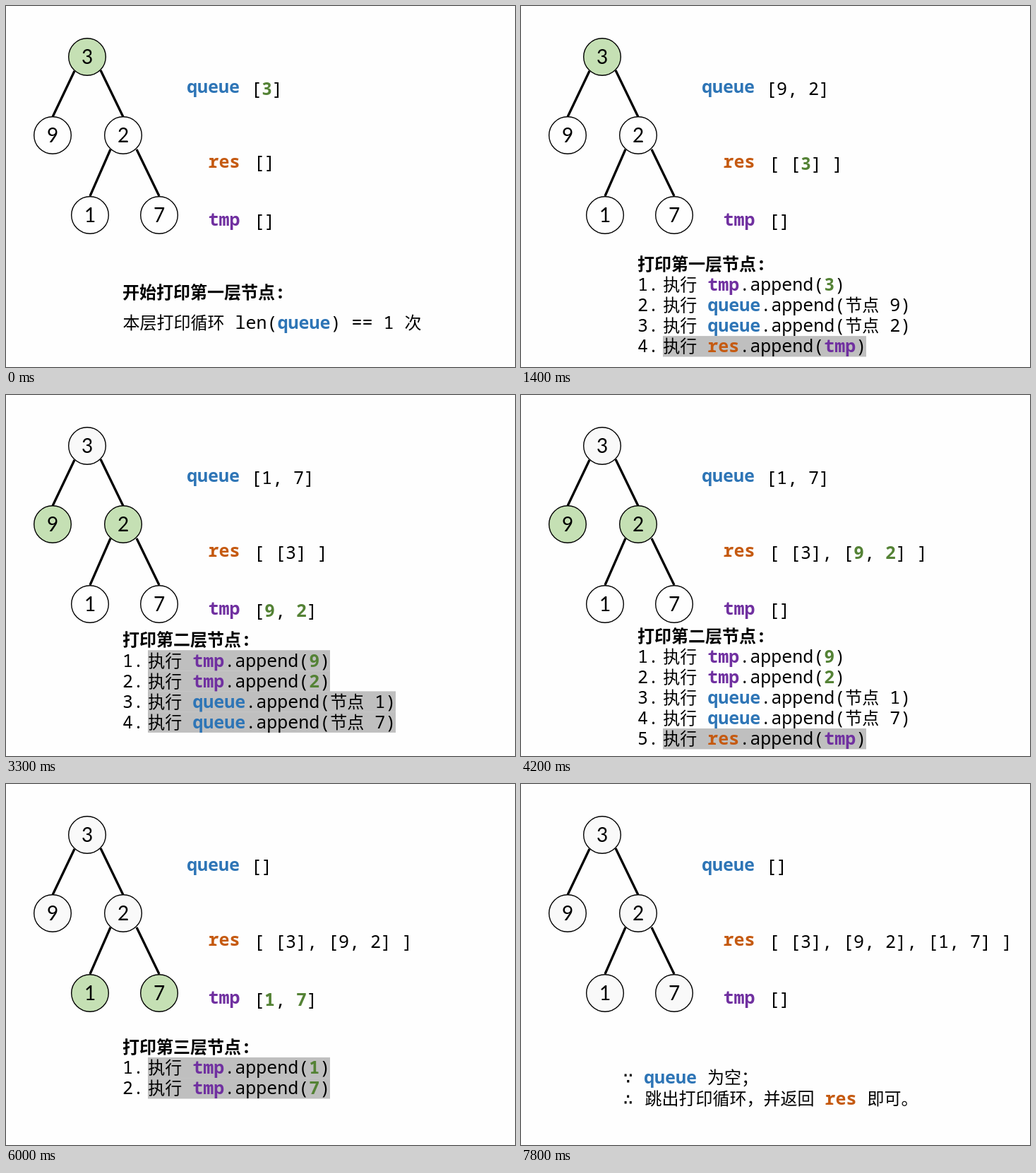
These frames come from a looping animation (721 px wide and 511 px high, 8000 ms). An HTML page:

```html
<!DOCTYPE html>
<html lang="zh-CN">
<head>
<meta charset="utf-8">
<style>
  html, body { margin: 0; height: 100%; overflow: hidden; background: #fefefe; }
  svg { display: block; }
  text { font: 25px "Noto Sans Mono", monospace; white-space: pre; }
  .cjk { font: 300 24px "Noto Sans CJK SC Light", "Noto Sans CJK SC", sans-serif; }
  .title, .queue, .res, .tmp, .hot { font-weight: 700; }
  .title .cjk { font: 700 24px "Noto Sans CJK SC", sans-serif; }
  .queue { fill: #2e75b6; }
  .res { fill: #c55a11; }
  .tmp { fill: #7030a0; }
  .hot { fill: #548235; }
  .sign { font: 24px "DejaVu Sans Mono", monospace; }
  .node { font: 28px Lato, sans-serif; text-anchor: middle; }
</style>
</head>
<body>
<svg id="stage" width="721" height="511" viewBox="0 0 721 511"></svg>
<script>
const LOOP = 8000, CHAR = 15, LINE = 29.1;
const stage = document.getElementById('stage');

// value, x, y, level
const nodes = [[3, 115, 72, 0], [9, 66, 183, 1], [2, 166, 183, 1], [1, 119, 296, 2], [7, 217, 296, 2]];
const edges = 'M97 92L66 157M134 91L166 157M148 203L119 269M185 203L217 269';

// Variable names get their colour, *n is a highlighted number, Chinese runs get their own font.
function text(x, y, content, cls = '') {
  const spans = content.replace(/queue|res|tmp|\*(\d)|[\u3000-\u9fff，；]+/g, (run, digit) => {
    const name = digit ? 'hot' : /[a-z]/.test(run) ? run : 'cjk';
    return `<tspan class="${name}">${digit || run}</tspan>`;
  });
  return `<text x="${x}" y="${y}" class="${cls}">${spans}</text>`;
}

function tree(level) {
  return `<path d="${edges}" stroke="#000" stroke-width="3.3"/>` + nodes.map(([n, x, y, depth]) => {
    const fill = depth === level ? '#c5e0b4' : depth < level ? '#f9f9f9' : '#fefefe';
    return `<circle cx="${x}" cy="${y}" r="26.3" fill="${fill}" stroke="#000" stroke-width="1.4"/>` +
      text(x, y + 10, String(n), 'node');
  }).join('');
}

function variable(name, value, right, x, y) {
  return text(right - name.length * CHAR, y, name) + text(x, y + (value === '[]' ? 1.5 : 3), value);
}

function intro(ordinal, count) {
  return text(165, 414, `开始打印第${ordinal}层节点:`, 'title') +
    text(165.5, 457, `本层打印循环 len(queue) == ${count} 次`);
}

// Numbered calls; those from index `from` on are marked grey.
function steps(ordinal, top, from, calls) {
  return text(165, top - 6, `打印第${ordinal}层节点:`, 'title') + calls.map((call, i) => {
    const y = top + i * LINE;
    const wide = (call.match(/[\u4e00-\u9fff]/g) || []).length;
    const narrow = call.replace('*', '').length - wide;
    const width = 48 + CHAR * (narrow + 1) + wide * 24;
    const mark = i < from ? '' :
      `<rect x="201" y="${y}" width="${width}" height="${LINE + 0.3}" fill="#bfbfbf"/>`;
    return mark + text(165, y + 23.3, `${i + 1}.`) + text(201.3, y + 23.3, `执行 ${call}`);
  }).join('');
}

const ending = text(144.5, 424, '∵', 'sign') + text(174, 424, 'queue 为空；') +
  text(144.5, 454, '∴', 'sign') + text(175.5, 454, '跳出打印循环，并返回 res 即可。');

const save = 'res.append(tmp)';
const first = ['tmp.append(*3)', 'queue.append(节点 9)', 'queue.append(节点 2)'];
const second = ['tmp.append(*9)', 'tmp.append(*2)', 'queue.append(节点 1)', 'queue.append(节点 7)'];
const third = ['tmp.append(*1)', 'tmp.append(*7)'];

// start, tree level, queue, res, tmp, caption
const scenes = [
  [0, 0, '[*3]', '[]', '[]', intro('一', 1)],
  [500, 0, '[9, 2]', '[]', '[*3]', steps('一', 379.8, 0, first)],
  [1400, 0, '[9, 2]', '[ [*3] ]', '[]', steps('一', 379.8, 3, [...first, save])],
  [2300, 1, '[*9, *2]', '[ [3] ]', '[]', intro('二', 2)],
  [3300, 1, '[1, 7]', '[ [3] ]', '[*9, *2]', steps('二', 361.2, 0, second)],
  [4200, 1, '[1, 7]', '[ [3], [*9, *2] ]', '[]', steps('二', 355.6, 4, [...second, save])],
  [5100, 2, '[*1, *7]', '[ [3], [9, 2] ]', '[]', intro('三', 2)],
  [6000, 2, '[]', '[ [3], [9, 2] ]', '[*1, *7]', steps('三', 387, 0, third)],
  [6900, 2, '[]', '[ [3], [9, 2], [*1, *7] ]', '[]', steps('三', 387, 2, [...third, save])],
  [7800, 3, '[]', '[ [3], [9, 2], [1, 7] ]', '[]', ending]
];

let shown;
function frame() {
  const time = performance.now() % LOOP;
  const scene = scenes.findLast(([start]) => start <= time);
  if (scene !== shown) {
    const [, level, queue, res, tmp, caption] = shown = scene;
    stage.innerHTML = tree(level) +
      variable('queue', queue, 331, 347, 123) +
      variable('res', res, 331.5, 351, 228.5) +
      variable('tmp', tmp, 331.5, 351, 311) +
      caption;
  }
  requestAnimationFrame(frame);
}
frame();
</script>
</body>
</html>
```
